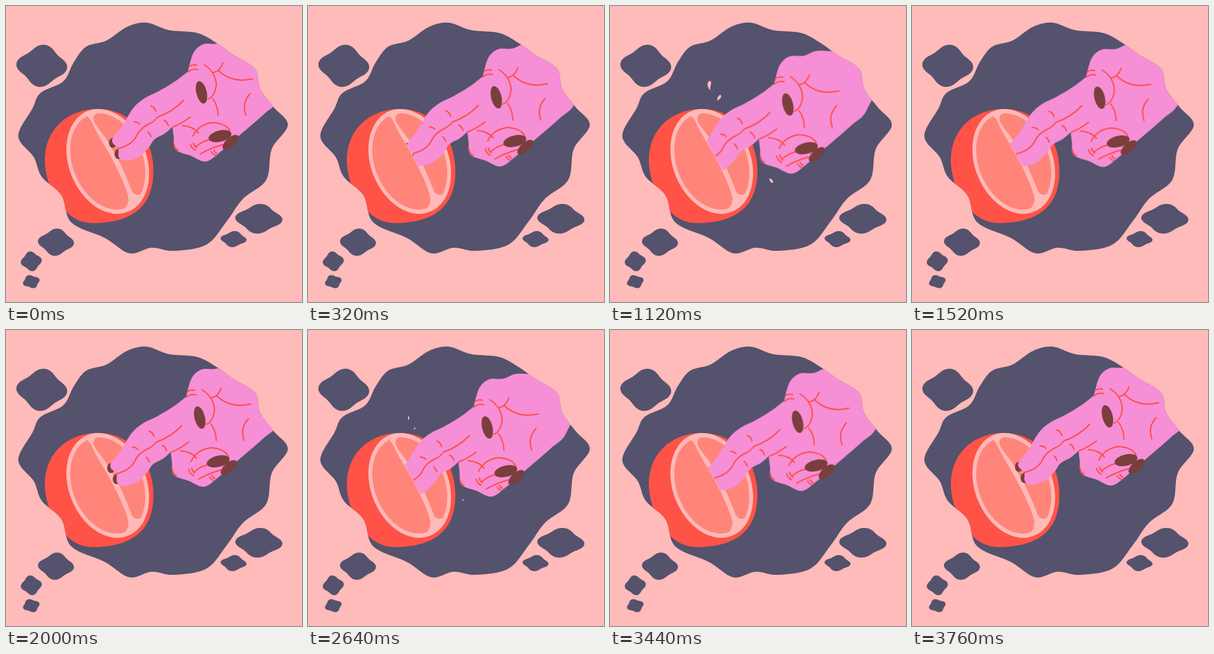
An HTML page for the animation above (3.84 s loop, 480 px wide and 480 px high).

```html
<!DOCTYPE html>
<html lang="en">
<head>
<meta charset="utf-8">
<title>Fruit daydream</title>
<style>
  html, body { margin: 0; width: 100%; height: 100%; overflow: hidden; background: #ffbaba; }
  svg { display: block; width: 100%; height: 100%; }
  .cloud { fill: #54526d; }
  .rind { fill: #ff5347; }
  .pith { fill: #ffb9b7; }
  .flesh { fill: #ff857b; }
  .skin { fill: #f68fd6; }
  .nail { fill: #7a3e3c; }
  .line { fill: none; stroke: #ff4b3e; stroke-width: 2; stroke-linecap: round; stroke-linejoin: round; }
  .hand { animation: poke 1920ms infinite; }
  .drop { fill: #ffbaba; animation: squirt 1920ms infinite; }

  /* every pose is held for 80 ms */
  @keyframes poke {
    0% { transform: translate(0, 0); animation-timing-function: steps(12); }
    50% { transform: translate(-35px, 24px); animation-timing-function: steps(11); }
    95.8333%, 100% { transform: translate(0, 0); }
  }
  @keyframes squirt {
    0%, 29.1667% {
      transform: translate(calc(var(--x) * -1.4), calc(var(--y) * -1.4)) scale(0);
      animation-timing-function: steps(2);
    }
    37.5% {
      transform: translate(calc(var(--x) * -1), calc(var(--y) * -1)) scale(.42);
      animation-timing-function: steps(5);
    }
    58.3333% { transform: translate(0px, 0px) scale(1); animation-timing-function: steps(4); }
    75%, 100% { transform: translate(calc(var(--x) * .75), calc(var(--y) * .75)) scale(0); }
  }
</style>
</head>
<body>
<svg viewBox="0 0 480 480">
  <defs>
    <path id="dream"/>
    <clipPath id="inDream"><use href="#dream"/></clipPath>
    <clipPath id="slit">
      <path d="M120 0L137 183Q146 204 158 221Q171 243 183 267Q193 288 199 308L205 480H480V0Z"/>
    </clipPath>
    <clipPath id="inFace"><ellipse id="face" rx="63" ry="88" transform="translate(165 252) rotate(-22)"/></clipPath>
  </defs>

  <g class="cloud" id="puffs"><use href="#dream"/></g>

  <g clip-path="url(#inDream)">
    <path class="rind" d="M63 250C63 200 100 167 149 167C203 167 239 212 239 268C239 322 208 352 140 352C92 352 63 292 63 250Z"/>
    <use href="#face" class="pith"/>
    <ellipse class="flesh" rx="57" ry="81" transform="translate(165 252) rotate(-22)"/>
    <path class="pith" clip-path="url(#inFace)" d="M120 171Q134 177 139 188C147 207 158 221 170 244C182 266 194 292 198 308Q201 322 188 332L226 324L226 299Q212 313 204 300C194 274 184 250 172 232C163 213 152 203 144 190Q137 178 151 172Z"/>

    <g clip-path="url(#slit)">
      <g class="hand">
        <ellipse class="nail" cx="173" cy="222" rx="6" ry="8"/>
        <ellipse class="nail" cx="182" cy="240" rx="6" ry="8"/>
        <path class="skin" id="skin"/>
        <g class="nail">
          <ellipse rx="8.5" ry="18.5" transform="translate(317 140) rotate(-14)"/>
          <ellipse rx="19" ry="9" transform="translate(347 211) rotate(-14)"/>
          <ellipse rx="16" ry="7.5" transform="translate(364 221) rotate(-42)"/>
        </g>
        <!-- fingers, thumb and palm, folded fingers -->
        <g class="line">
          <path d="M182 231Q203 226 211 212Q216 199 232 191Q240 188 246 180Q270 172 288 153"/>
          <path d="M208 188Q214 188 217 192M235 162Q241 164 243 171M230 204Q234 207 235 212M256 185Q262 188 263 194M271 196Q284 191 299 180"/>
          <path d="M295 107Q302 101 311 103M297 98Q303 94 309 96M321 95Q340 107 341 128Q339 146 328 151"/>
          <path d="M336 108Q347 106 352 92M344 104Q366 126 400 118M335 150Q343 160 344 177M396 142Q382 157 389 177"/>
          <path d="M286 194Q303 195 312 206M303 211Q312 192 335 189Q356 190 363 202M315 240Q330 231 351 225M308 228Q317 220 329 217"/>
          <path d="M299 224Q301 231 307 234M304 222Q305 227 309 230M333 236Q335 241 340 242M337 234Q339 238 342 239M272 222Q273 231 279 234"/>
        </g>
      </g>
    </g>
  </g>

  <g transform="translate(161 129)">
    <path class="drop" style="--x:-2px;--y:-14px" d="M1.5 8C-1 5-3.5 1-2.8-3C-2.2-7 1-9 2.6-6.5C4-3 1 2 1.5 8Z"/>
  </g>
  <g transform="translate(177 149)">
    <path class="drop" style="--x:4px;--y:-11px" d="M-3.2 5C-3.5 0-1-4 1.5-4.7C4-5 3.8-1.5 2 .8C.5 3-1.5 3-3.2 5Z"/>
  </g>
  <g transform="translate(261 283)">
    <path class="drop" style="--x:10px;--y:7.5px" d="M-3.2-3.2C-.5-3.4 2.5-1.6 3.4 1.5C4 4.3 1.5 4.4-.3 2.6C-2 .8-1.8-1.2-3.2-3.2Z"/>
  </g>
</svg>
<script>
  const $ = id => document.getElementById(id);

  // Smooth closed curve through key points; a doubled point makes a corner.
  function smooth(text) {
    const pts = text.split(' ').map(p => p.split(',').map(Number));
    const at = i => pts[(i + pts.length) % pts.length];
    return pts.reduce((d, b, i) => {
      const a = at(i - 1), c = at(i + 1), e = at(i + 2);
      const out = b.map((v, k) => v + (c[k] - a[k]) / 6);
      const into = c.map((v, k) => v - (e[k] - b[k]) / 6);
      return d + `C${out} ${into} ${c}`;
    }, 'M' + pts[0]) + 'Z';
  }

  // Four-lobed puff: an ellipse whose radius swells and shrinks.
  function puff(cx, cy, rx, ry, turn) {
    let d = '';
    for (let i = 0; i < 72; i++) {
      const a = i * Math.PI / 36;
      const r = (1 + .11 * Math.cos(4 * (a - turn))) / 1.1;
      d += `${i ? 'L' : 'M'}${cx + rx * r * Math.cos(a)} ${cy + ry * r * Math.sin(a)}`;
    }
    const path = document.createElementNS('http://www.w3.org/2000/svg', 'path');
    path.setAttribute('d', d + 'Z');
    $('puffs').append(path);
  }

  $('dream').setAttribute('d', smooth(
    '110,91 130,66 163,56 196,34 228,27 264,39 311,44 343,61 368,79 404,102 412,134 434,164 ' +
    '457,193 431,232 422,282 384,313 358,349 325,387 272,397 236,392 200,401 160,376 ' +
    '106,351 90,307 58,277 45,245 20,211 43,166 56,141 93,122'));

  $('skin').setAttribute('d', smooth(
    '173,222 174,213 190,192 206,166 224,150 248,138 276,121 295,106 295,106 304,76 320,62 ' +
    '343,61 376,53 470,70 446,147 420,174 376,212 352,233 325,252 300,243 275,233 272,212 ' +
    '270,196 270,196 257,207 241,216 231,230 215,245 195,251 183,245 182,231'));

  puff(58, 97, 41, 34, .1);
  puff(81, 383, 29, 22, .1);
  puff(41, 414, 17, 16, -.15);
  puff(41, 447, 14, 11, -.4);
  puff(410, 345, 38, 24, .1);
  puff(369, 378, 21, 13, .15);
</script>
</body>
</html>
```
